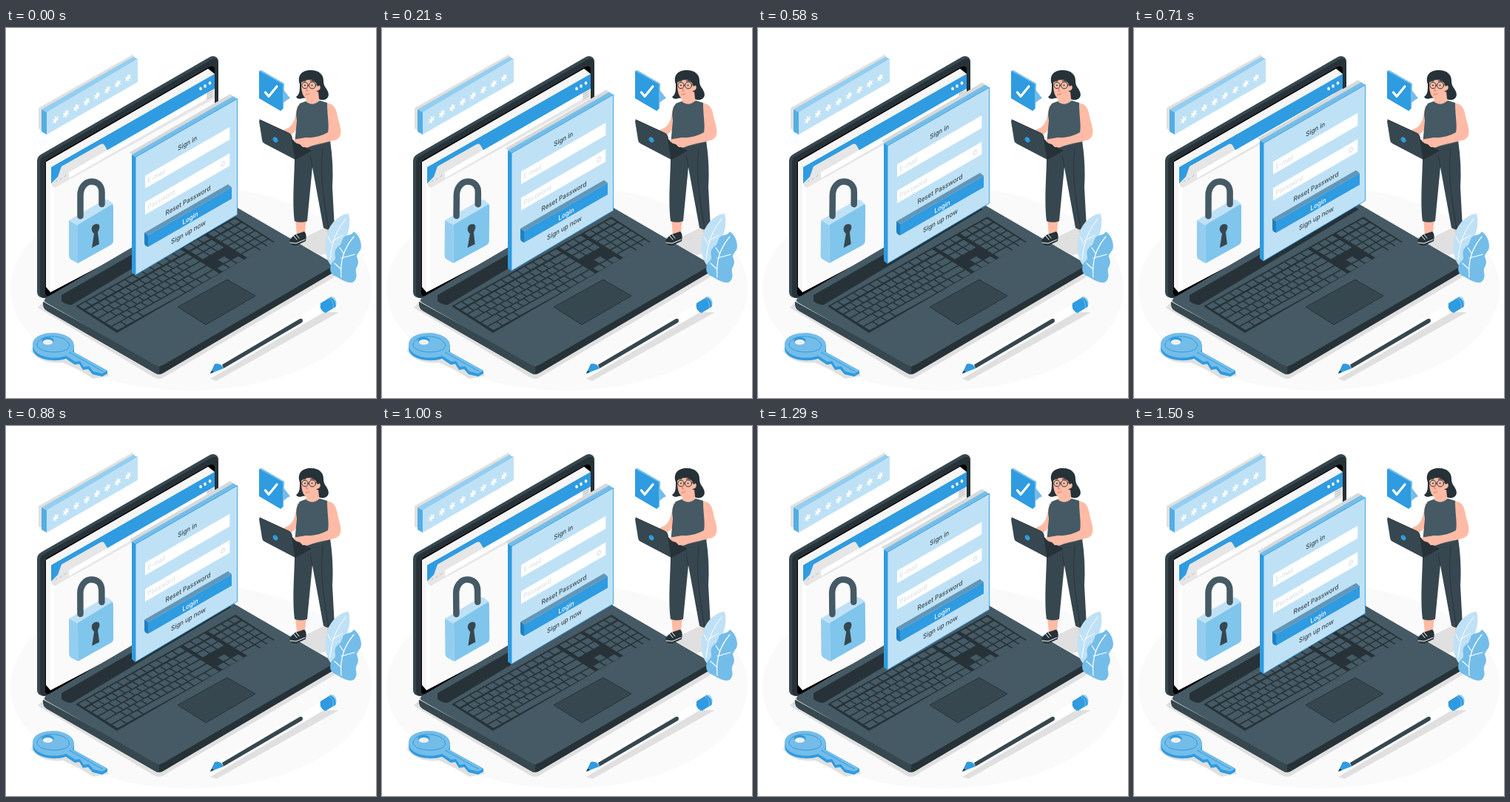
An HTML page that plays this animation: 500 by 500 pixels, repeating every 1.54 s.

```html
<!DOCTYPE html>
<html lang="en">
<head>
<meta charset="utf-8">
<title>Sign in</title>
<style>
html, body { margin: 0; width: 100%; height: 100%; overflow: hidden; background: #fff }
svg { display: block; width: 100vw; height: 100vh }
text { font: 500 9.2px Inter, sans-serif; fill: #37474f; text-anchor: middle }
.hint { fill: #d5dde2; text-anchor: start; font-weight: 400 }
.blue { fill: #2f9be0 } .mid { fill: #74bde9 } .pale { fill: #bfe1f6 }
.ink { fill: #263238 } .slate { fill: #37474f } .steel { fill: #455a64 }
.shade { fill: #e0e0e0 } .white { fill: #fff } .skin { fill: #ffbba5 }
.line { fill: none; stroke-linecap: round; stroke-linejoin: round }
</style>
</head>
<body>
<svg viewBox="0 0 500 500">
<ellipse cx="250" cy="352" rx="244" ry="138" fill="#fafafa"/>

<g id="shadows" class="shade">
  <path d="M43 378L52 368 215 450 443 326V337L213 472Q207 476 200 472Z"/>
  <path d="M385 292L428 271 442 275V302L425 307 400 293Z"/>
  <path d="M276 474L430 384 450 384 284 477Z"/>
  <path d="M44 108L171 36 174 39V44L52 116V140L44 136Z"/>
</g>

<g id="password">
  <path fill="#93cef0" d="M48 110L172 39 178 42 55 114Z"/>
  <path fill="#53ade5" d="M48 110L55 114V144L48 140Z"/>
  <path class="pale" d="M55 114L178 42V73L55 144Z"/>
  <g id="stars" class="line" stroke="#fff" stroke-width="1.7"/>
</g>

<g id="screen">
  <path class="slate" d="M42 180Q42 174 47 171L274 40Q280 36 285 40 287 42 287 46V250L60 363Q52 367 45 363 42 361 42 356Z"/>
  <path class="ink" d="M46 182Q46 176 50 174L277 43Q287 38 287 50V240L58 363Q46 368 46 358Z"/>
  <path fill="#000" d="M53 183Q53 180 56 178L274 53Q282 50 282 57V240L60 361Q53 364 53 358Z"/>
  <path fill="#f5f5f5" d="M54 181L273 55 282 62V240L60 357 54 350Z"/>
  <path class="white" d="M60 187L282 62V240L60 357Z"/>
  <path fill="#fafafa" d="M65 213L282 88V240L65 354Z"/>
  <path class="blue" d="M61 188L282 62V82L61 210Z"/>
  <path fill="#e6e6e6" d="M62 209L70 201 75 187 128 157Q132 155 134 160L137 165 282 82V95L66 216 62 214Z"/>
  <path class="white" d="M85 195L271 88V96L85 203Z"/>
  <path class="line" stroke="#b8b8b8" d="M67 208l2-2M73 205l2-2M79 201l2-2M272 90l7-4M272 93l7-4M272 96l7-4"/>
  <g class="white">
    <ellipse cx="263" cy="82" rx="1.8" ry="2.3"/><ellipse cx="269" cy="78.5" rx="1.8" ry="2.3"/><ellipse cx="275.5" cy="74.5" rx="1.8" ry="2.3"/>
  </g>
</g>

<g id="lock">
  <path class="pale" d="M85 260L133 232Q136 231 139 233L145 238 97 267Z"/>
  <path fill="#93cef0" d="M85 260L97 267V318L88 313Q85 311 85 308Z"/>
  <path fill="#80c5ec" d="M97 266L142 239Q145 237 145 241V288Q145 291 142 293L97 318Z"/>
  <path class="line" stroke="#455a64" stroke-width="8.5" d="M100.5 254V226C100.5 216 107 207.5 115.5 207.500S129.5 213 129.5 222V238"/>
  <path class="slate" d="M119 278C114 274 115 266 121 265S128 269 124 276L126 292 116 297Z"/>
</g>

<g id="base">
  <path class="ink" d="M50 370L207 457 442 320V327Q442 331 438 333L213 466Q207 470 201 466L55 382Q50 379 50 372Z"/>
  <path class="slate" d="M50 370L207 456V468Q204 468 201 466L55 382Q50 379 50 372Z"/>
  <path class="steel" d="M55 364L287 228 437 315Q445 319 438 324L213 455Q207 458 201 455L54 371Q49 368 55 364Z"/>
  <path class="ink" d="M75 361L290 237 304 245 89 374Q82 375 75 369Z"/>
  <path class="ink" d="M94 376L310 255 363 289 150 412Z"/>
  <g id="keys" class="steel" transform="matrix(215 -120 55 34 95 376)"/>
  <path class="slate" stroke="#263238" d="M232 377L299 340 337 362 270 401Z"/>
</g>

<g id="panel">
  <path fill="#d5d9db" d="M167 168L303 89 308 93 172 172Z"/>
  <path class="mid" d="M170 171L307 92 312.5 95.5 175 174.5Z"/>
  <path class="blue" d="M170 171L175 174V334L170 330Z"/>
  <path class="pale" d="M175 174.5L312.5 95.5V252L175 333.5Z" stroke="#2f9be0" stroke-width=".9"/>
  <g transform="matrix(.866 -.5 0 1 175 174)">
    <path class="white" d="M15 33H147V50H15ZM15 68.5H147V85.5H15Z"/>
    <text x="81" y="25">Sign in</text>
    <text class="hint" x="19" y="45">E-mail</text>
    <text class="hint" x="19" y="80.5">Password</text>
    <circle class="line" cx="136.5" cy="77.5" r="2.3" stroke="#d5dde2"/>
    <circle class="line" cx="136.5" cy="77.5" r="3.8" stroke="#d5dde2" stroke-dasharray=".1 2.9"/>
    <text x="82" y="103">Reset Password</text>
  </g>
  <path fill="#6496b6" d="M187 276.5L300 211 305 215 192 280Z"/>
  <path fill="#1f7fc0" d="M187 276.5L192 280V295.500L189 294Q187 293 187 290Z"/>
  <path class="blue" d="M192 280L305 215V230.5L192 295.5Z"/>
  <g transform="matrix(.866 -.5 0 1 175 174)">
    <text x="85.5" y="128.5" style="fill:#fff">Login</text>
    <text x="82.5" y="146">Sign up now</text>
  </g>
</g>

<g id="check">
  <path class="mid" d="M374 82L384 95 380 97 374 102Z"/>
  <path class="mid" d="M342 58L345 57 376 75 375 109 371 112Z"/>
  <path class="blue" d="M342 58L374 76V109L371 112 342 95Z"/>
  <path class="line" stroke="#fff" stroke-width="3.2" d="M350.5 87L355 92.500 366 79"/>
</g>

<g id="woman">
  <path class="skin" d="M391 258H406L404 276 393 279ZM433 268H443V285H435Z"/>
  <path class="ink" d="M383 288Q384 284 391 279L403 275Q407 278 405 288L392 294Q384 294 383 288Z"/>
  <path class="line" stroke="#fff" stroke-width="1" d="M389 281l4 5M392 279l4 5M384 290l8 1 12-5"/>
  <path class="slate" d="M390 160L438 152Q443 185 441 215L444 270Q436 275 429 270L414 188 407 261Q398 264 390 261C386 232 391 190 390 160Z"/>
  <path class="line" stroke="#263238" stroke-width=".9" d="M414 188L411 172M428 163C424 200 429 230 436 271"/>
  <path class="ink" d="M397 76C393 64 400 57 412 57C424 57 429 64 429 71C429 78 432 80 434 84C438 91 435 96 430 97C424 98 420 95 418 93L400 95C396 97 393 95 392 93C397 90 397 84 397 76Z"/>
  <path class="skin" d="M394 104C391 118 391 127 383 134L371 140 377 147C391 145 396 133 399 118ZM406 88L422 86 424 104Q414 110 405 102Z"/>
  <path class="skin" d="M399 75C399 70 405 69 410 69C415 70 420 72 421 77C424 76 426 80 424 83Q422 85 420 85C419 92 414 96 408 96C402 95 399 88 399 75Z"/>
  <path class="ink" d="M397 76C397 64 404 60 412 61C420 62 425 68 426 76L421 79Q420 73 412 70Q402 69 397 76Z"/>
  <g class="line" stroke="#263238" stroke-width="1">
    <circle cx="404" cy="77.5" r="4.2"/><circle cx="414" cy="77.5" r="4.5"/>
    <path d="M418.5 77L423 76M402 72l3-.5M411 71.500l5 .5"/>
    <path stroke="#e56f5c" d="M407 80l-1 5 2 0M405 90q3 1 5-2"/>
  </g>
  <circle class="ink" cx="404" cy="77.5" r="1"/><circle class="ink" cx="413.5" cy="77.5" r="1"/>
  <path class="steel" d="M397 102L405 99Q414 107 424 98L434 101Q439 112 436 128L439 153Q416 163 390 158L393 125Q390 111 397 102Z"/>
  <path class="skin" d="M434 102C445 102 447 112 449 124C454 139 454 148 446 151C434 155 420 156 409 161Q400 164 394 158L388 154Q389 150 394 150L405 148C417 149 428 145 435 141C437 132 434 118 434 102Z"/>
  <path class="ink" d="M386 150L397 157 413 166 391 178Z"/>
  <path class="slate" d="M343 124L382 142Q385 143 386 147L391 178 349 156Q346 154 346 151L342 126Z"/>
  <path class="line" stroke="#263238" d="M343 124L382 142Q385 143 386 147L391 178"/>
  <path class="skin" d="M389 153Q388 150 394 150L407 149 418 154Q406 162 401 161L397 157 393 156Z"/>
  <ellipse class="blue" cx="364" cy="151" rx="3" ry="4" transform="rotate(-35 364 151)"/>
</g>

<g id="leaves">
  <path class="pale" d="M440 322C430 310 429 290 436 272C443 258 455 251 463 251C466 262 464 275 459 283C453 300 447 312 440 322Z"/>
  <path class="line" stroke="#fff" d="M438 313Q440 280 459 258M440 291l-5-9M441 288l14-8"/>
  <path class="mid" d="M466 344C458 344 451 338 446 336C438 333 437 326 439 320C441 315 446 314 445 309C443 300 447 296 451 294C455 290 453 284 459 281C464 279 467 280 470 275C476 279 480 287 480 295C480 302 474 304 474 309C476 314 477 318 474 323C471 328 475 333 473 338Q471 344 466 344Z"/>
  <path class="line" stroke="#fff" stroke-width="1.2" d="M453 337Q450 305 470 282M453 311l18-5M453 326l-9-8M456 304l-5-7"/>
</g>

<g id="key">
  <path class="shade" d="M33 435Q45 455 77 452L100 463 118 474 139 470 136 463Z"/>
  <path class="blue" d="M36 428H92V438L137 463V467L130 471 117 468 111 461 104 462 99 454 93 455 81 447C61 453 36 446 36 433Z"/>
  <path class="mid" d="M36 428C36 418 48 412 63 412C80 412 92 420 92 429Q92 434 90 437L137 463 130 467 118 464 112 457 105 458 100 450 94 451 81 443C59 450 36 442 36 428Z"/>
  <path class="line" stroke="#2f9be0" stroke-width="1" d="M42 428C43 413 79 413 85 427S43 442 42 428M85 438L131 464"/>
  <ellipse class="blue" cx="56.5" cy="422.5" rx="8" ry="5"/>
  <ellipse fill="#f0f0f0" cx="56.5" cy="424.5" rx="6.8" ry="3.5"/>
</g>

<g id="pen">
  <path class="white" d="M285 454L425 373 430 383 294 461Z"/>
  <path class="slate" d="M292 455L397 393Q401 392 401 396L400 398 294 460Z"/>
  <path class="blue" d="M276 467L282 454Q290 452 294 460Z"/>
  <path class="ink" d="M276 467L278 463 281 465Z"/>
  <path class="blue" d="M425 372L438 364Q447 366 445 377L432 385Q423 382 425 372Z"/>
  <path class="line" stroke="#74bde9" d="M436 365Q444 368 442 379"/>
  <path class="line" stroke="#2f9be0" stroke-width=".8" d="M438 364Q445 362 446 372L445 377"/>
</g>
</svg>
<script>
const LOOP = 1540, PEAK = 725;
const $ = id => document.getElementById(id);

function add(parent, tag, attrs) {
  const el = document.createElementNS('http://www.w3.org/2000/svg', tag);
  for (const name in attrs) el.setAttribute(name, attrs[name]);
  parent.append(el);
}

for (let i = 0; i < 8; i++) {
  const x = 67 + 14 * i, y = 124 - 8.1 * i;
  add($('stars'), 'path', { d: `M${x} ${y - 4}v8M${x - 3} ${y}h6M${x - 3} ${y + 3.5}l6-7` });
}

// Keyboard in unit space: x runs along the hinge, y towards the user
const rowTop = row => row ? .03 + row * .163 : .02;
function keys(row, x, end, weights) {
  const unit = (end - x) / weights.reduce((a, b) => a + b);
  for (const weight of weights) {
    const width = unit * weight;
    add($('keys'), 'rect', {
      x: x + .004, y: rowTop(row), width: width - .007, height: row ? .135 : .13
    });
    x += width;
  }
}
const ones = n => Array(n).fill(1);
keys(0, .005, .65, ones(13));
keys(1, .005, .65, [...ones(13), 2]);
keys(2, .005, .65, [1.5, ...ones(12), 1.5]);
keys(3, .005, .65, [1.8, ...ones(11), 2.2]);
keys(4, .005, .65, [2.3, ...ones(10), 2.7]);
keys(5, .005, .65, [1.3, 1.2, 1.2, 6, 1.2, 1.2, 1.2, 1.3]);
for (const row of [0, 1, 2]) keys(row, .665, .805, ones(3));
keys(4, .712, .758, [1]);
keys(5, .665, .805, ones(3));
for (const row of [0, 1, 2, 3, 4]) keys(row, .82, .995, ones(4));
keys(5, .82, .995, [2, 1, 1]);

function draw() {
  const t = performance.now() % LOOP;
  const gap = Math.abs(t - PEAK);
  const lift = 19 - .0265 * Math.min(gap, LOOP - gap);
  const sway = Math.asin(Math.sin(2 * Math.PI * t / LOOP)) * 2 / Math.PI;
  $('panel').setAttribute('transform', `translate(0 ${-lift})`);
  $('lock').setAttribute('transform', `rotate(${sway} 115 260)`);
  requestAnimationFrame(draw);
}
draw();
</script>
</body>
</html>
```
